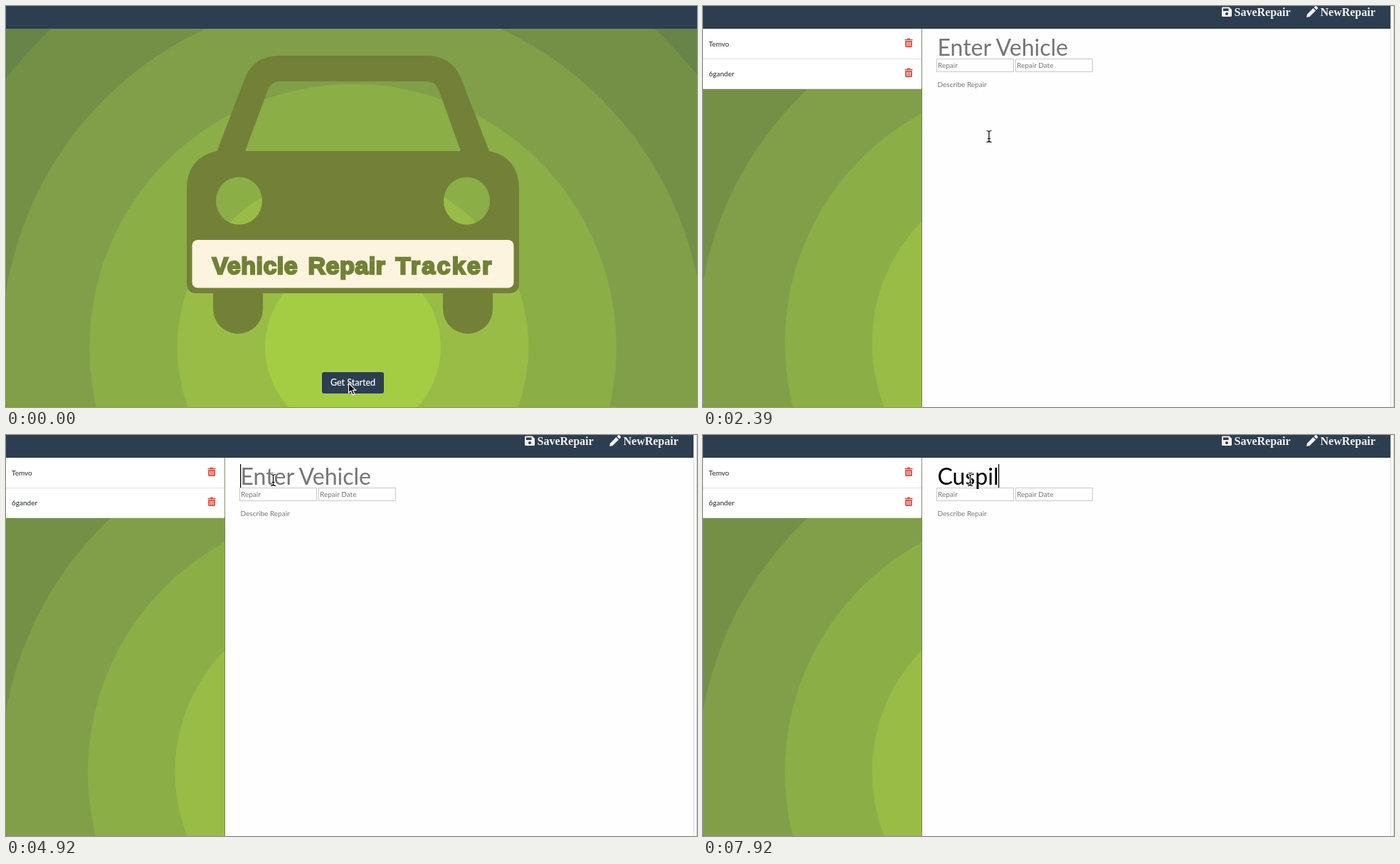
An HTML page that plays this animation: 971x564 px, repeating every 8000 ms.

```html
<!DOCTYPE html>
<html lang="en">
<head>
<meta charset="utf-8">
<title>Vehicle Repair Tracker</title>
<style>
  html, body { margin: 0; width: 100%; height: 100%; overflow: hidden; background: #fff; }
  svg { display: block; width: 100%; height: 100%; font-family: Lato, sans-serif; }
  text { white-space: pre; }
  .ui { font-size: 12.5px; fill: #fff; stroke: #fff; stroke-width: .2; }
  .nav { font: bold 16px "Liberation Serif", serif; fill: #f2f2f2; }
  .small { font-size: 10px; fill: #212529; }
  .hint { font-size: 10px; fill: #757575; }
  .plate { font: bold 34px "Liberation Sans", sans-serif; fill: #728137; stroke: #728137; stroke-width: 2.4; }
</style>
</head>
<body>
<svg viewBox="0 0 971 564" preserveAspectRatio="none">
  <defs>
    <clipPath id="side"><rect y="32" width="307.5" height="532"/></clipPath>
    <g id="trash" fill="#e0483a">
      <path d="M0 1.2h3.2L4 0h3l.8 1.2H11v1.5H0z"/>
      <path fill-rule="evenodd" d="M.7 3.5h9.6v7.8q0 1.2-1.2 1.2H1.9Q.7 12.500 .7 11.300zM2.700 5v6h1V5zM5 5v6h1V5zM7.300 5v6h1V5z"/>
    </g>
  </defs>

  <g id="home">
    <g id="homeRings"></g>
    <rect width="971" height="32" fill="#2c3e50"/>
    <path fill="#728137" fill-rule="evenodd" d="M296.500 204L335 103Q348 70 383 70H592Q627 70 640 103L679 204Q721 213 721 258V390Q721 404 707 404H684V426A35 35 0 0 1 614 426V404H361V426A35 35 0 0 1 291 426V404H268Q254 404 254 390V258Q254 213 296.500 204Z
      M336 204H639L608 118Q603 106 591 106H385Q373 106 368 118Z
      M295 274a32.500 33.500 0 0 0 65 0a32.500 33.500 0 0 0 -65 0Z
      M615 274a32.500 33.500 0 0 0 65 0a32.500 33.500 0 0 0 -65 0Z"/>
    <rect x="261.500" y="329" width="452" height="67.500" rx="8" fill="#fdf4df"/>
    <g class="plate">
      <text x="289.500" y="377" letter-spacing=".5">Vehicle</text>
      <text x="424.500" y="377" letter-spacing=".5">Repair</text>
      <text x="547.500" y="377" letter-spacing="2.3">Tracker</text>
    </g>
    <rect id="btnRing" x="442" y="513" width="91" height="34" rx="4.500" fill="#2c3e50" opacity=".5"/>
    <rect id="btn" x="444" y="515" width="87" height="30" rx="3"/>
    <text class="ui" x="487.500" y="534" text-anchor="middle">Get Started</text>
  </g>

  <g id="app">
    <rect width="971" height="564" fill="#fefefe"/>
    <g id="sideRings" clip-path="url(#side)"></g>
    <rect width="966" height="32" fill="#2c3e50"/>
    <g fill="#f2f2f2">
      <path fill-rule="evenodd" d="M730.500 1.500H739.500L743 5V13.500Q743 15 741.500 15H730.500Q729 15 729 13.500V3Q729 1.500 730.500 1.500ZM731 3.500V7H738.500V3.500ZM736 9a2 2 0 1 0 .01 0Z"/>
      <path d="M848 16L849 11.500L857.500 3L861 6.500L852.500 15ZM858.500 2L860 .5Q861.200 -.3 862.300 .6L863.500 1.800Q864.400 3 863.500 4L862 5.500Z"/>
    </g>
    <text class="nav" x="746.500" y="14">SaveRepair</text>
    <text class="nav" x="867.500" y="14">NewRepair</text>

    <path d="M0 32H307.500V114Q307.500 117 304.500 117H0Z" fill="#fff"/>
    <path d="M0 74.500H307M0 116.500H305" stroke="#dfdfdf"/>
    <path d="M307.500 32V564" stroke="#69744f" stroke-opacity=".7"/>
    <text class="small" x="8" y="57">Temvo</text>
    <text class="small" x="8" y="99">6gander</text>
    <use href="#trash" x="283.500" y="45.500"/>
    <use href="#trash" x="283.500" y="87.500"/>

    <path d="M966.500 0V564" stroke="#dedede"/>
    <path d="M970.500 0V564" stroke="#d2d2d2"/>

    <path id="ring" d="M325.500 94V73.500Q325.500 71.500 327.500 71.500H437Q439.500 71.500 439.500 73.500V93H437V74.500H328.500V94Z" fill="#a9cfa0"/>
    <g fill="#fff" stroke="#c9c9c9">
      <rect id="field" x="328.500" y="74.500" width="108" height="18"/>
      <rect x="439.500" y="74.500" width="108" height="18"/>
    </g>
    <text class="hint" x="330" y="87">Repair</text>
    <text class="hint" x="441" y="87">Repair Date</text>
    <text class="hint" x="329.500" y="114">Describe Repair</text>
    <text id="name" x="329.500" y="70" font-size="32"></text>
    <rect id="caret" width="1.200"/>
  </g>

  <path id="arrow" d="M0 0V13.500L3.200 10.700L5.700 16.300L8.300 15.200L5.800 9.800H10Z" transform="translate(481.500 530.500)" fill="#000" stroke="#fff" stroke-width="1.200"/>
  <g id="hand" fill="#fff" stroke="#000" stroke-width="1.100" stroke-linejoin="round">
    <path d="M-3.500 2.500L-5.200-5.500Q-5.300-7.400-3.900-7.500Q-2.700-7.500-2.300-6L-1-1.700Q-.6-3 .7-2.700Q1.800-2.500 2-1.300Q2.600-2.500 3.800-2Q4.800-1.600 4.900-.4Q6-1.200 6.900 0Q7.600 1.500 7 4.500L5.500 9H-1.500Q-2.500 6.800-5 4.500Q-7 2.500-6.300 1.500Q-5.200.4-3.500 2.500Z"/>
    <path d="M.5 3V6.500M2.600 3V6.500M4.700 3V6.500" stroke-width=".8"/>
  </g>
  <g id="beam" fill="none">
    <path id="beamPath" d="M-3.500-8Q-.5-8 0-6.500Q.5-8 3.500-8M0-6.500V6.500M-3.500 8Q-.5 8 0 6.500Q.5 8 3.500 8M-2 3H2" stroke="#fff" stroke-width="2.800"/>
    <use href="#beamPath"/>
    <path d="M-3.500-8Q-.5-8 0-6.500Q.5-8 3.500-8M0-6.500V6.500M-3.500 8Q-.5 8 0 6.500Q.5 8 3.500 8M-2 3H2" stroke="#000" stroke-width="1.200"/>
  </g>
</svg>
<script>
const LOOP = 8000;
const $ = id => document.getElementById(id);
const show = (id, on) => $(id).setAttribute('display', on ? 'inline' : 'none');
const set = (id, attrs) => { for (const k in attrs) $(id).setAttribute(k, attrs[k]); };

function drawRings(id, cx, cy, step) {
  const colors = ['#688448', '#749047', '#819f49', '#8bae47', '#99bc46', '#a5cd43'];
  $(id).innerHTML = colors.map((c, i) =>
    `<circle cx="${cx}" cy="${cy}" r="${step * (6 - i)}" fill="${c}"/>`).join('');
}
drawRings('homeRings', 487.5, 480, 123.4);
drawRings('sideRings', 482.5, 474, 122.5);

// Last entry whose start time has passed
const at = (list, t) => list.filter(e => e[0] <= t).pop();

const moves = [[0, 484.5, 541.5]];
[1790, 1940, 2080, 2230, 2380, 2530, 2680].forEach((t, i) => {
  const p = (i + 1) / 7, e = p * p * (3 - 2 * p);
  moves.push([t, 484.5 - 103 * e, 541.5 - 446.5 * e]);
});
moves.push([2970, 380, 92], [3120, 378, 89], [3420, 376.5, 82], [3570, 376, 76],
  [3720, 375.5, 66], [3870, 375.5, 61], [4170, 375.5, 63.5]);

const typed = [[0, ''], [7020, 'C'], [7170, 'Cu'], [7320, 'Cus'],
  [7620, 'Cusp'], [7770, 'Cuspi'], [7920, 'Cuspil']];
const carets = [[0, ''], [2970, 'field'], [3570, ''], [3870, 'name'], [4320, ''],
  [4920, 'name'], [5370, ''], [5820, 'name'], [6420, ''], [6870, 'name']];

function draw(t) {
  const home = t < 1190;
  show('home', home);
  show('app', !home);
  show('arrow', t < 900);
  show('hand', t >= 900 && t < 1790);
  show('beam', t >= 1790);

  const pressed = t >= 1040;
  show('btnRing', pressed);
  set('btn', { fill: pressed ? '#1d2a37' : t >= 900 ? '#222f3d' : '#2c3e50' });

  const [, x, y] = at(moves, t);
  const place = `translate(${x} ${y})`;
  set('hand', { transform: place });
  set('beam', { transform: place });

  const focus = t >= 2970 && t < 3870;
  show('ring', focus);
  set('ring', { opacity: t < 3120 ? .5 : 1 });
  set('field', { stroke: focus ? '#a9cfa0' : '#c9c9c9' });

  const word = at(typed, t)[1], name = $('name');
  name.textContent = word || 'Enter Vehicle';
  name.setAttribute('fill', word ? '#000' : '#757575');

  const caret = at(carets, t)[1];
  show('caret', caret);
  if (caret === 'field') set('caret', { x: 330, y: 78, height: 12 });
  if (caret === 'name') {
    const width = word ? name.getComputedTextLength() : 0;
    set('caret', { x: 329 + Math.round(width), y: 41, height: 33 });
  }
}

const start = performance.now();
function tick() {
  draw((performance.now() - start) % LOOP);
  requestAnimationFrame(tick);
}
tick();
</script>
</body>
</html>
```
